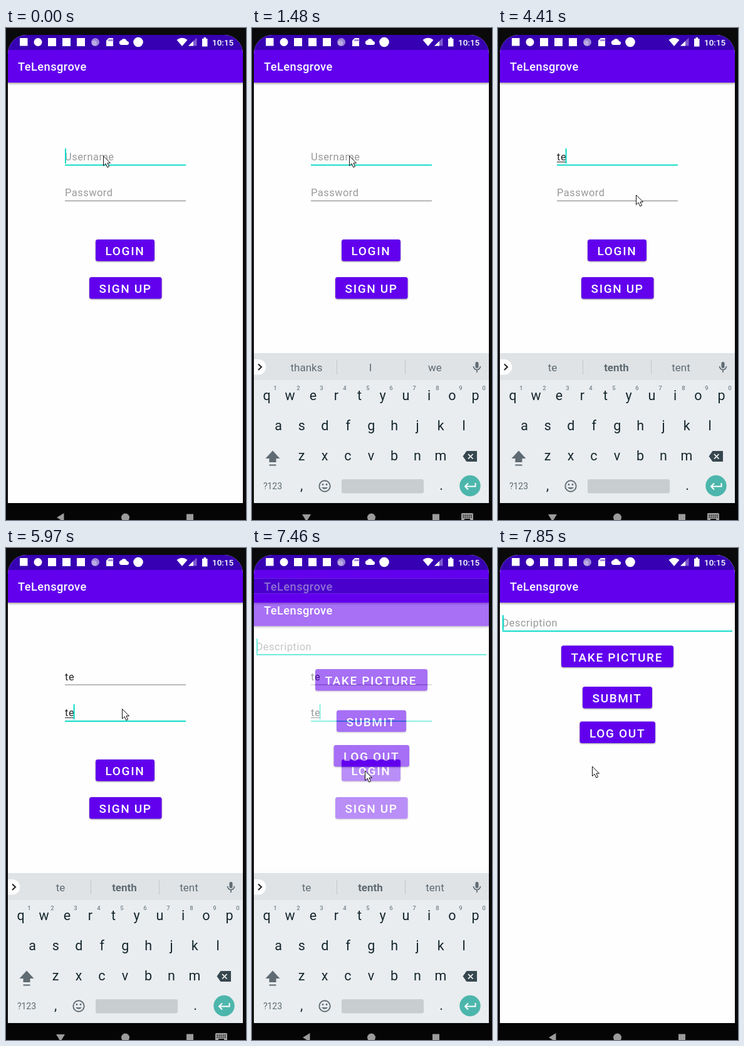
An HTML page that plays this animation: 383x784 px, repeating every 8 s.

```html
<!DOCTYPE html>
<html lang="en">
<head>
<meta charset="utf-8">
<title>Login demo</title>
<style>
html, body { margin: 0; width: 100%; height: 100%; overflow: hidden; background: #0a0a0b; }
svg { display: block; }
text { font-family: Roboto, sans-serif; white-space: pre; }
.title { font-size: 18.25px; font-weight: 500; letter-spacing: .45px; fill: #fff; }
.field { font-size: 16.42px; letter-spacing: .51px; fill: #222; }
.hint { fill: #999; }
.label { font-size: 19px; font-weight: 500; letter-spacing: 1.65px; fill: #fff; }
.key { font-size: 21.5px; fill: #16272e; text-anchor: middle; }
.digit { font-size: 9.5px; font-weight: 500; fill: #75828a; text-anchor: middle; }
.word { font-size: 17px; fill: #5f6b72; text-anchor: middle; }
.raised { filter: drop-shadow(0 1px 1px #0006); }
.bar { filter: drop-shadow(0 2px 1.5px #0005); }
</style>
</head>
<body>
<svg id="stage" width="383" height="784" viewBox="0 0 383 784"></svg>
<script>
const TEAL = '#03dac5', PURPLE = '#6200ee', GREY = '#5f6b72';
const $ = id => document.getElementById(id);
const show = (id, on) => $(id).setAttribute('visibility', on ? 'visible' : 'hidden');
const rect = (x, y, w, h, fill, extra = '') =>
  `<rect x="${x}" y="${y}" width="${w}" height="${h}" fill="${fill}" ${extra}/>`;
const text = (x, y, cls, str, extra = '') => `<text x="${x}" y="${y}" class="${cls}" ${extra}>${str}</text>`;
const circle = (x, y, r, fill, extra = '') => `<circle cx="${x}" cy="${y}" r="${r}" fill="${fill}" ${extra}/>`;
const path = (d, fill, extra = '') => `<path d="${d}" fill="${fill}" ${extra}/>`;
const stroke = (color, width) => `stroke="${color}" stroke-width="${width}"`;

const button = (x, y, w, label) =>
  rect(x, y, w, 34.5, PURPLE, 'rx="3.5" class="raised"') + text(x + 15.5, y + 25, 'label', label);

const page = content =>
  rect(3, 11, 375, 746, '#fefefe') + rect(3, 35, 375, 52, PURPLE, 'class="bar"') +
  rect(3, 11, 375, 24, '#3700b3') + text(19, 68, 'title', 'TeLensgrove') + content;

const field = (id, y, lineY) =>
  text(94, y, 'field', '', `id="${id}"`) + rect(94, lineY, 193, 2, TEAL, `id="${id}Line"`) +
  rect(94, y + 2, 14, 1, '#222', `id="${id}Mark"`) + rect(94, y - 19, 2, 24, TEAL, `id="${id}Caret"`);

const loginPage = page(
  field('user', 211, 217.5) + field('pass', 268, 275) +
  button(143, 337, 94, 'LOGIN') + button(133, 397, 115.5, 'SIGN UP'));

const postPage = page(
  text(6.5, 125, 'field hint', 'Description') + rect(7, 131.5, 367, 2, TEAL) + rect(7, 107, 2, 24, TEAL) +
  button(101, 155.5, 179, 'TAKE PICTURE') + button(135, 221, 111, 'SUBMIT') +
  button(130.5, 276.5, 120.5, 'LOG OUT'));

const statusIcons =
  rect(22, 16, 12.5, 12.5, '#fff') + circle(51, 22.5, 6.5, '#fff') +
  [73.5, 96.5, 119.5].map(x => rect(x - 6.5, 16, 13, 13, '#fff')).join('') +
  circle(142.5, 22.5, 6.5, '#9a86d4') + circle(141, 24, 4, '#b9abe2') +
  path('M164 16H171V29H160V20Z', '#fff') + path('M164.500 18v3M167 18v3M169.300 18v3', 'none', stroke('#3700b3', 1.1)) +
  path('M184 27a3.800 3.800 0 0 1 0-7.500a5 5 0 0 1 9 1.500a3 3 0 0 1 0 6Z', '#fff') +
  circle(211, 22.5, 7.8, '#fff') +
  path('M272.500 19Q281 12.500 289.500 19L281 29Z', '#fff') +
  path('M291 28.500L304.500 15.500V28.500Z', '#fff', 'opacity=".35"') + path('M291 28.500L299 21V28.500Z', '#fff') +
  path('M313 17H315.500V15H319V17H321.500V29.500H313Z', '#fff') +
  text(329, 28, 'title', '10:15', 'style="font-size:13.5px;letter-spacing:0"');

const keyRow = (letters, x, y) => [...letters].map((c, i) => text(x + 37 * i, y, 'key', c)).join('');

const keyboard =
  rect(3, 518, 375, 239, '#e9edf0') + rect(3, 518, 375, 43, '#dfe3e6') +
  path('M3 528H10a12 12 0 0 1 0 24.500H3Z', '#fff') +
  path('M10 535.500L15 540.300L10 545', 'none', stroke('#222', 2)) +
  [87, 189, 292].map((x, i) => text(x, 547, 'word', '', `id="word${i}"`)).join('') +
  rect(135, 529, 1, 23, '#c2c7ca') + rect(244, 529, 1, 23, '#c2c7ca') +
  rect(356.5, 532, 5, 10, GREY, 'rx="2.5"') +
  path('M353.500 539a5.500 5.500 0 0 0 11 0M359 545v4', 'none', stroke(GREY, 1.7)) +
  keyRow('qwertyuiop', 23.5, 593) + keyRow('asdfghjkl', 42.2, 641) + keyRow('zxcvbnm', 79, 689) +
  [...'1234567890'].map((c, i) => text(37 + 37 * i, 577, 'digit', c)).join('') +
  path('M33 673.500L44.500 686H38.500V692H27.500V686H21.500Z', GREY) + rect(27.5, 695.5, 11, 2, GREY) +
  path('M342.500 674H359V691H342.500L336.500 682.500Z', '#37474f') +
  path('M345 679l7.500 7.500M352.500 679l-7.500 7.500', 'none', stroke('#fff', 1.7)) +
  text(33, 735, 'word', '?123', 'style="font-size:14px"') +
  text(79, 736, 'key', ',') + text(302, 736, 'key', '.') +
  circle(116, 730, 8.7, 'none', stroke(GREY, 1.9)) + circle(113, 727.5, 1.4, GREY) + circle(119, 727.5, 1.4, GREY) +
  path('M111 732a5.500 4.500 0 0 0 10 0Z', GREY) +
  rect(143, 719, 131, 22.5, '#c8cdd0', 'rx="3"') +
  circle(348, 729.5, 16.7, '#4db6ac') +
  path('M356.500 725V730.500H340M345 725.500L340 730.500L345 735.500', 'none', stroke('#fff', 2));

const NAV = '#9b9b9b';
const navBar =
  rect(0, 757, 383, 27, '#050505') +
  path('M81 780L92.500 773V787Z', NAV, 'id="back"') +
  `<g id="imeNav">${path('M80 775H94L87 786.500Z', NAV)}${rect(334, 773, 19, 12, NAV, 'rx="1.5"')}` +
  path('M336.500 776.500H351M336.500 779.500H351', 'none', stroke('#050505', 1.6) + ' stroke-dasharray="1.7 1.4"') +
  rect(339, 782, 9, 2, '#050505') + '</g>' +
  circle(190.5, 780, 6.5, NAV) + rect(288, 774.5, 11, 11, NAV);

$('stage').innerHTML =
  `<clipPath id="screen"><rect x="3" y="11" width="375" height="820" rx="30"/></clipPath>
  <g clip-path="url(#screen)">${loginPage}<g id="post">${postPage}</g>${statusIcons}<g id="keys">${keyboard}</g></g>
  ${navBar}
  <path id="mouse" d="M0 0V15.500L3.700 12.200L6.200 18L9 16.800L6.400 11.200H11Z" fill="#fff" stroke="#111" stroke-width="1"/>`;

// Each track holds a row of values from its start time until the next row.
const held = (track, t) => track.findLast(row => row[0] <= t).slice(1);
const inside = (spans, t) => spans.some(([from, to]) => t >= from && t < to);

const mousePath = [
  [0, 155.5, 204], [2150, 163, 290], [2300, 178, 390], [2450, 181, 412], [2760, 184, 340], [2900, 184, 264],
  [3480, 205, 262], [3610, 234, 264], [3740, 227, 265], [3870, 220.5, 266], [4810, 208, 263], [4960, 193, 254],
  [5400, 190, 250], [5550, 185.5, 256.5], [6400, 212, 285], [6530, 205, 335], [6670, 180.5, 355],
  [7730, 164, 351], [7850, 150.5, 348]];
const empty = ['thanks', 'I', 'we'], first = ['t', 'the', 'to'], second = ['te', 'tenth', 'tent'];
const suggestions = [
  [0, ...empty], [4140, ...first], [4410, ...second], [4960, ...empty], [5820, ...first], [5970, ...second]];
const typed = { user: [[0, ''], [4140, 't'], [4410, 'te']], pass: [[0, ''], [5820, 't'], [5970, 'te']] };
const caretOn = {
  user: [[0, 470], [940, 1330], [2000, 2450], [2900, 3480], [3870, 4960]],
  pass: [[4960, 5550], [5820, 6400], [6940, 8000]] };
const postMotion = [[0, 0, 60], [7460, .56, 37.5], [7610, 1, 5], [7730, 1, 0]];
const keyboardDrop = [[0, 240], [1480, 0], [7730, 120], [7850, 240]];

function drawField(id, hint, focused, t) {
  const [value] = held(typed[id], t), label = $(id);
  label.textContent = value || hint;
  label.setAttribute('class', value ? 'field' : 'field hint');
  const width = value ? label.getComputedTextLength() : 0;
  $(id + 'Mark').setAttribute('width', width);
  show(id + 'Mark', focused && value);
  $(id + 'Caret').setAttribute('x', 94 + Math.max(0, width - 1.5));
  show(id + 'Caret', inside(caretOn[id], t));
  $(id + 'Line').setAttribute('fill', focused ? TEAL : '#7c7c7c');
  $(id + 'Line').setAttribute('height', focused ? 1.9 : 1);
}

function draw(t) {
  drawField('user', 'Username', t < 4960, t);
  drawField('pass', 'Password', t >= 4960, t);

  const words = held(suggestions, t);
  words.forEach((word, i) => $('word' + i).textContent = word);
  $('word1').setAttribute('font-weight', words[1] === 'I' ? 400 : 700);

  const [alpha, shift] = held(postMotion, t);
  $('post').setAttribute('opacity', alpha);
  $('post').setAttribute('transform', `translate(0 ${shift})`);
  $('keys').setAttribute('transform', `translate(0 ${held(keyboardDrop, t)})`);

  const imeOpen = t >= 1330 && t < 7330;
  show('imeNav', imeOpen);
  show('back', !imeOpen);
  $('mouse').setAttribute('transform', `translate(${held(mousePath, t).join(' ')})`);
}

function loop() {
  draw(performance.now() % 8000);
  requestAnimationFrame(loop);
}
loop();
</script>
</body>
</html>
```
